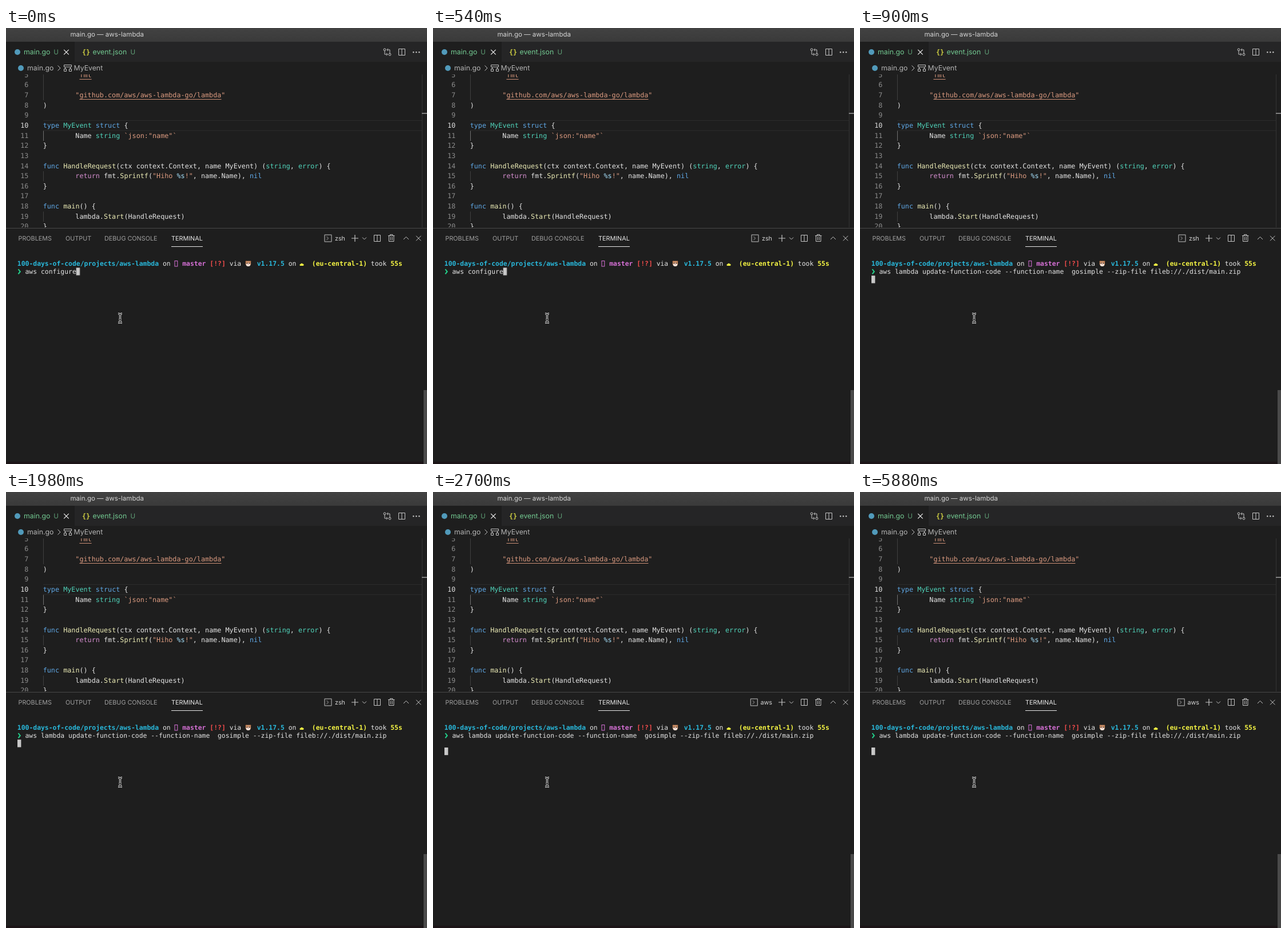
An HTML page for the animation above (8000 ms loop, 736 by 761 pixels).

```html
<!DOCTYPE html>
<html lang="en">
<head>
<meta charset="utf-8">
<title>Editor and terminal</title>
<style>
html, body { margin: 0; width: 100%; height: 100%; overflow: hidden; background: #1e1e1e; }
svg { display: block; width: 736px; height: 761px; }
text { white-space: pre; text-rendering: geometricPrecision; }
.ui { font-family: Inter, sans-serif; font-size: 12.3px; fill: #d4d4d4; }
.panel { font-size: 10.8px; fill: #a0a0a0; }
.code, .term { font-family: "DejaVu Sans Mono", monospace; fill: #e4e4e4; }
.code { font-size: 11.77px; }
.term { font-size: 11.41px; }
.b { font-weight: 700; }
.num { fill: #8c8c8c; text-anchor: end; }
.num.on { fill: #e0e0e0; }
.k { fill: #5fa8e6; }
.t { fill: #50d3ba; }
.f { fill: #ececb6; }
.s { fill: #dc9b80; }
.r { fill: #d48ece; }
.v { fill: #a8e4ff; }
.cyan { fill: #29b8db; }
.pink { fill: #d670d6; }
.red { fill: #f14c4c; }
.yellow { fill: #f5f543; }
.green { fill: #73c991; }
.icon { fill: none; stroke: #c5c5c5; stroke-width: 1; }

/* Hard cuts at 900 ms and 2700 ms of the 8000 ms loop */
.typed, .sent, .shell, .child, .cursor { animation: 8s step-end infinite; }
.typed { animation-name: until-900; }
.sent { animation-name: from-900; }
.shell { animation-name: until-2700; }
.child { animation-name: from-2700; }
.cursor { animation-name: cursor; fill: #c8c8c8; }
@keyframes until-900 { 0% { opacity: 1 } 11.25%, 100% { opacity: 0 } }
@keyframes from-900 { 0% { opacity: 0 } 11.25%, 100% { opacity: 1 } }
@keyframes until-2700 { 0% { opacity: 1 } 33.75%, 100% { opacity: 0 } }
@keyframes from-2700 { 0% { opacity: 0 } 33.75%, 100% { opacity: 1 } }
@keyframes cursor {
  0% { transform: translate(122.7px, 418.4px) }
  11.25% { transform: translate(20px, 432.2px) }
  33.75%, 100% { transform: translate(20px, 446px) }
}
</style>
</head>
<body>
<svg viewBox="0 0 736 761">
  <defs>
    <linearGradient id="bar" x2="0" y2="1">
      <stop stop-color="#424242"/><stop offset="1" stop-color="#3a3a3a"/>
    </linearGradient>
    <clipPath id="editor"><path d="M0 81H736V348H0Z"/></clipPath>
    <path id="split" d="M.5.5H11.5V11.5H.5ZM6 .5V11.5"/>
    <path id="close" d="M0 0L8.5 8.5M8.5 0L0 8.5"/>
    <path id="prompt-icon" d="M.5.5H12.5V12.5H.5ZM4 3.5L7 6.5L4 9.5"/>
    <path id="beam" d="M-3.5-8Q0-8 0-5Q0-8 3.5-8M0-5V5M-3.5 8Q0 8 0 5Q0 8 3.5 8M-2 2.5H2"/>
  </defs>
  <rect width="736" height="761" fill="#1e1e1e"/>

  <!-- Title bar and tabs -->
  <rect width="736" height="24" fill="url(#bar)"/>
  <rect x="120" y="24" width="616" height="35" fill="#252526"/>
  <g class="ui">
    <text x="112.5" y="15" font-size="11.5">main.go — aws-lambda</text>
    <circle cx="20" cy="42" r="5" fill="#519aba"/>
    <text class="green" x="31" y="46.2">main.go</text>
    <text class="green" x="83.3" y="46.2" font-size="11.6" opacity=".75">U</text>
    <text class="code b" x="133" y="45.8" style="fill:#cbcb41">{}</text>
    <text class="green" x="151.5" y="46.2">event.json</text>
    <text class="green" x="217.5" y="46.2" font-size="11.6" opacity=".75">U</text>
    <circle cx="26" cy="70" r="5" fill="#519aba"/>
    <text x="37" y="74.3" fill="#b4b4b4">main.go</text>
    <text x="118.5" y="74.3" fill="#b4b4b4">MyEvent</text>
  </g>
  <g class="icon">
    <use href="#close" x="101.2" y="37.8" stroke="#eee" stroke-width="1.2"/>
    <path d="M90.5 65.5L95 70L90.5 74.5"/>
    <path d="M101.5 64.5H114.5V68H101.5ZM101.5 71.5H105.5V75.5H101.5ZM110.5 71.5H114.5V75.5H110.5ZM103.5 68V71.5M112.5 68V71.5"/>
    <circle cx="662" cy="37.8" r="1.9"/><circle cx="671" cy="46.2" r="1.9"/>
    <path d="M662 39.7V46H667M665 43.8L667.2 46L665 48.2M671 44.3V38H666M668 35.8L665.8 38L668 40.2"/>
    <use href="#split" x="686" y="36"/>
  </g>
  <g fill="#c5c5c5"><circle cx="712.3" cy="42.3" r="1.2"/><circle cx="717.3" cy="42.3" r="1.2"/><circle cx="722.3" cy="42.3" r="1.2"/></g>

  <!-- Editor -->
  <g clip-path="url(#editor)">
    <path d="M65 161.5H727M65 179H727" stroke="#2c2c2c"/>
    <path d="M65.5 81V126M65.5 250V267.5M65.5 320.5V338" stroke="#404040"/>
    <path d="M65.5 179.5V197" stroke="#707070"/>
    <path d="M128.4 89.5H149.6M128.4 124.5H376.5" stroke="#ce9178"/>
    <path d="M727.5 81V348" stroke="#343434"/>
    <path d="M727 149H736" stroke="#a0a0a0" stroke-width="1.5"/>
    <g class="code" id="code"></g>
  </g>

  <!-- Panel header -->
  <path d="M0 349.5H736" stroke="#484848"/>
  <path d="M289 381.5H344" stroke="#e7e7e7"/>
  <g class="ui panel">
    <text x="21.5" y="371">PROBLEMS</text>
    <text x="104" y="371">OUTPUT</text>
    <text x="172" y="371">DEBUG CONSOLE</text>
    <text x="289" y="371" fill="#e7e7e7">TERMINAL</text>
    <g fill="#d4d4d4" text-anchor="end">
      <text class="shell" x="593" y="371">zsh</text>
      <text class="child" x="593" y="371">aws</text>
    </g>
  </g>
  <g class="icon">
    <use class="shell" href="#prompt-icon" x="556.5" y="360.5"/>
    <use class="child" href="#prompt-icon" x="554.7" y="360.5"/>
    <path d="M610 361V373M604 367H616" stroke-width="1.2"/>
    <path d="M623 365.5L626.5 369L630 365.5"/>
    <use href="#split" x="643" y="361"/>
    <path d="M668 362.5H679.5M671.5 362.5V360.5H676V362.5M669.5 362.5V372.5H678V362.5M672.4 364.5V370.5M675.2 364.5V370.5"/>
    <path d="M695 369L699.5 364.5L704 369"/>
    <use href="#close" x="717" y="362.8"/>
  </g>

  <!-- Terminal -->
  <g class="term">
    <text x="19.8" y="415.2"><tspan class="b cyan">100-days-of-code/projects/aws-lambda</tspan> on   <tspan class="b pink">master</tspan> <tspan class="b red">[!?]</tspan> via    <tspan class="b cyan">v1.17.5</tspan> on    <tspan class="b yellow">(eu-central-1)</tspan> took <tspan class="b yellow">55s</tspan></text>
    <rect x="295" y="406.5" width="4.8" height="9.5" fill="none" stroke="#d670d6"/>
    <g>
      <circle cx="420.3" cy="408" r="1.8" fill="#b9784c"/><circle cx="426.7" cy="408" r="1.8" fill="#b9784c"/>
      <circle cx="423.5" cy="411.3" r="4.7" fill="#cf926a"/>
      <ellipse cx="423.5" cy="413.3" rx="3.6" ry="2.6" fill="#f3e6dc"/>
      <circle cx="421.5" cy="410.5" r="1" fill="#333"/><circle cx="425.5" cy="410.5" r="1" fill="#333"/>
      <circle cx="423.5" cy="412.3" r=".8" fill="#d0706c"/>
    </g>
    <path class="yellow" d="M514.7 415a1.4 1.4 0 0 1 .2-2.8a2.1 2.1 0 0 1 3.9-.4a1.6 1.6 0 0 1 .4 3.2Z"/>
    <path d="M21.5 421L24.8 425.2L21.5 429.4" fill="none" stroke="#23d18b" stroke-width="2"/>
    <text class="typed" x="33.5" y="428.9">aws configure</text>
    <text class="sent" x="33.5" y="428.9">aws lambda update-function-code --function-name  gosimple --zip-file fileb://./dist/main.zip</text>
    <rect class="cursor" width="6.4" height="13.2"/>
  </g>
  <rect y="757" width="736" height="4" fill="#1c1517"/>
  <rect x="730" y="632" width="6" height="129" fill="#4a4a4a"/>

  <!-- Mouse pointer -->
  <g fill="none" transform="translate(199.5 506.5)">
    <use href="#beam" stroke="#f0f0f0" stroke-width="3.2"/>
    <use href="#beam" stroke="#000" stroke-width="1.2"/>
  </g>
</svg>
<script>
const FIRST = 5, ACTIVE = 10, LINE = 17.63, TAB = ' '.repeat(8);
const c = (kind, text) => `<tspan class="${kind}">${text}</tspan>`;
const lines = [
  TAB + c('s', '"fmt"'),
  '',
  TAB + c('s', '"github.com/aws/aws-lambda-go/lambda"'),
  ')',
  '',
  `${c('k', 'type')} ${c('t', 'MyEvent')} ${c('k', 'struct')} {`,
  `${TAB}Name ${c('t', 'string')} ${c('s', '`json:"name"`')}`,
  '}',
  '',
  `${c('k', 'func')} ${c('f', 'HandleRequest')}(ctx context.Context, name MyEvent) (${c('t', 'string')}, ${c('t', 'error')}) {`,
  `${TAB}${c('r', 'return')} fmt.${c('f', 'Sprintf')}(${c('s', '"Hiho ')}${c('v', '%s')}${c('s', '!"')}, name.Name), ${c('k', 'nil')}`,
  '}',
  '',
  `${c('k', 'func')} ${c('f', 'main')}() {`,
  `${TAB}lambda.${c('f', 'Start')}(HandleRequest)`,
  '}'
];
document.getElementById('code').innerHTML = lines.map((line, i) => {
  const n = FIRST + i, y = 174 + (n - ACTIVE) * LINE;
  return `<text class="num ${n === ACTIVE ? 'on' : ''}" x="39.3" y="${y}">${n}</text><text x="64.7" y="${y}">${line}</text>`;
}).join('');
</script>
</body>
</html>
```
